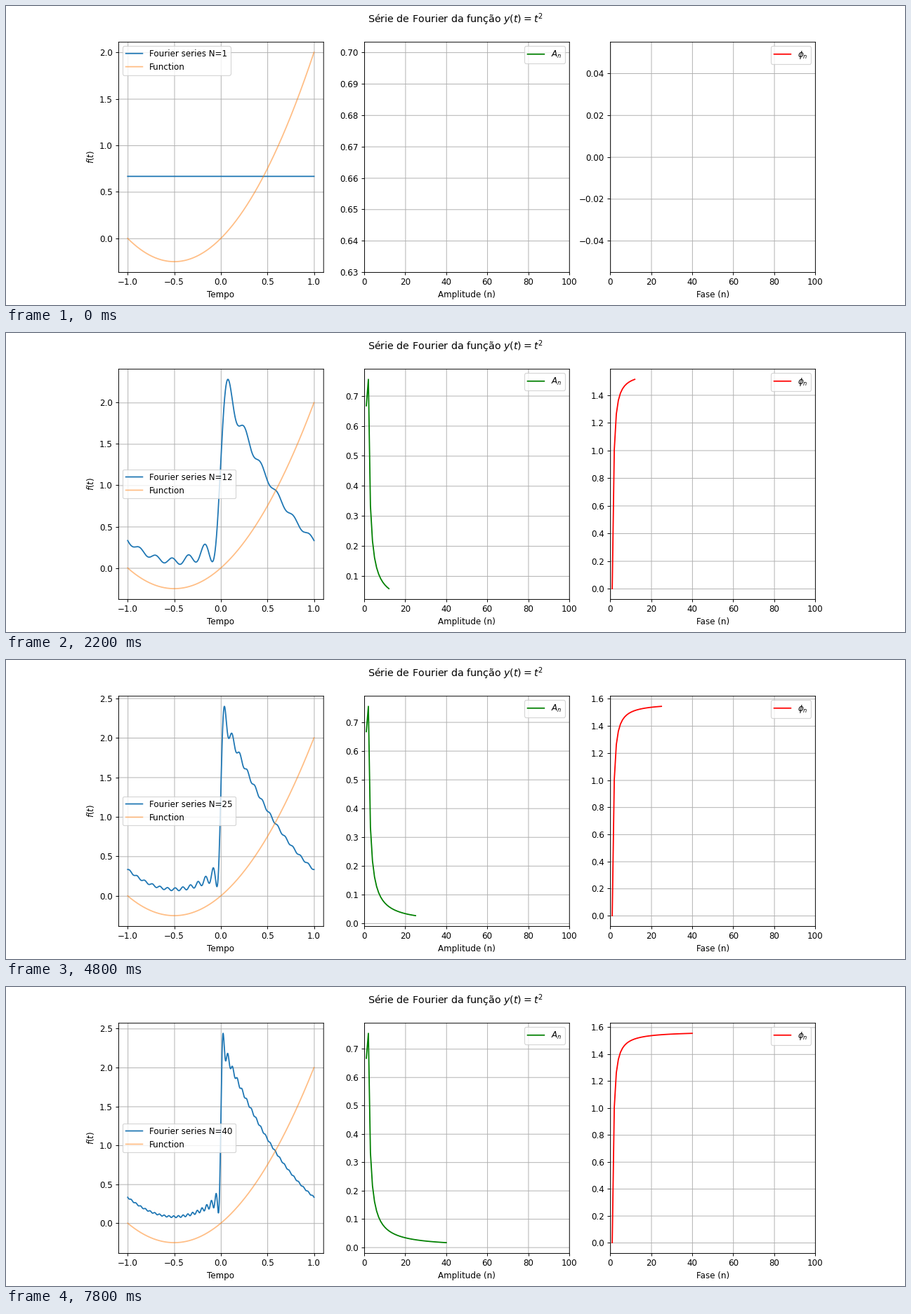
Write a matplotlib script that moves like this. It is 1280x427 px and loops after 8000 ms.

```python
import numpy as np
import matplotlib.pyplot as plt
from matplotlib.animation import FuncAnimation
from matplotlib.patheffects import Stroke

WIDTH, HEIGHT = 1280, 427
DPI = WIDTH / 15
FRAMES = 40
EPS = 1e-6  # keeps the pixel size from being truncated downwards

t = np.linspace(-1, 1, 1000)

# Trigonometric coefficients; the constant term is kept undivided
k = np.arange(1, FRAMES)
a = 4 / (np.pi * k) ** 2
b = 2 / (np.pi * k)
order = np.arange(1, FRAMES + 1)
amplitude = np.append(2 / 3, np.hypot(a, b))
phase = np.append(0, np.arctan2(b, a))


def series(n):
    terms = np.arange(n)[:, None]
    waves = np.cos(np.pi * terms * t - phase[:n, None])
    return amplitude[:n] @ waves


fig, (ax_time, ax_amp, ax_phase) = plt.subplots(
    1, 3, figsize=(WIDTH / DPI + EPS, HEIGHT / DPI + EPS), dpi=DPI)
fig.suptitle("Série de Fourier da função $y(t)=t^2$")

fit, = ax_time.plot(t, series(1), label="Fourier series N=1")
ax_time.plot(t, t**2 + t, alpha=0.5, label="Function")
ax_time.set(xlabel="Tempo", ylabel="$f(t)$")

amp_line, = ax_amp.plot([], [], "g", label="$A_n$")
ax_amp.set(xlabel="Amplitude (n)", xlim=(0, 100))

phase_line, = ax_phase.plot([], [], "r", label=r"$\phi_n$")
ax_phase.set(xlabel="Fase (n)", xlim=(0, 100))

# Lines keep their subpixel places; hairlines sit on pixel centres on average
hairline = {"snap": False, "path_effects": [Stroke(offset=(0.36, -0.36))]}
axes = (ax_time, ax_amp, ax_phase)
for ax in axes:
    ax.grid(True, **hairline)
    plt.setp(list(ax.spines.values()), **hairline)
    legend = ax.legend(loc="best")
    plt.setp([*ax.get_lines(), *legend.get_lines()], snap=False)
fit_label = ax_time.get_legend().get_texts()[0]


def update(i):
    n = i + 1
    fit.set_ydata(series(n))
    fit_label.set_text(f"Fourier series N={n}")
    amp_line.set_data(order[:n], amplitude[:n])
    phase_line.set_data(order[:n], phase[:n])
    for ax in axes:
        ax.relim()
        ax.autoscale_view()
    return fit, fit_label, amp_line, phase_line


anim = FuncAnimation(fig, update, frames=FRAMES, interval=200,
                     repeat=True, repeat_delay=0, blit=False)
plt.show()
```
